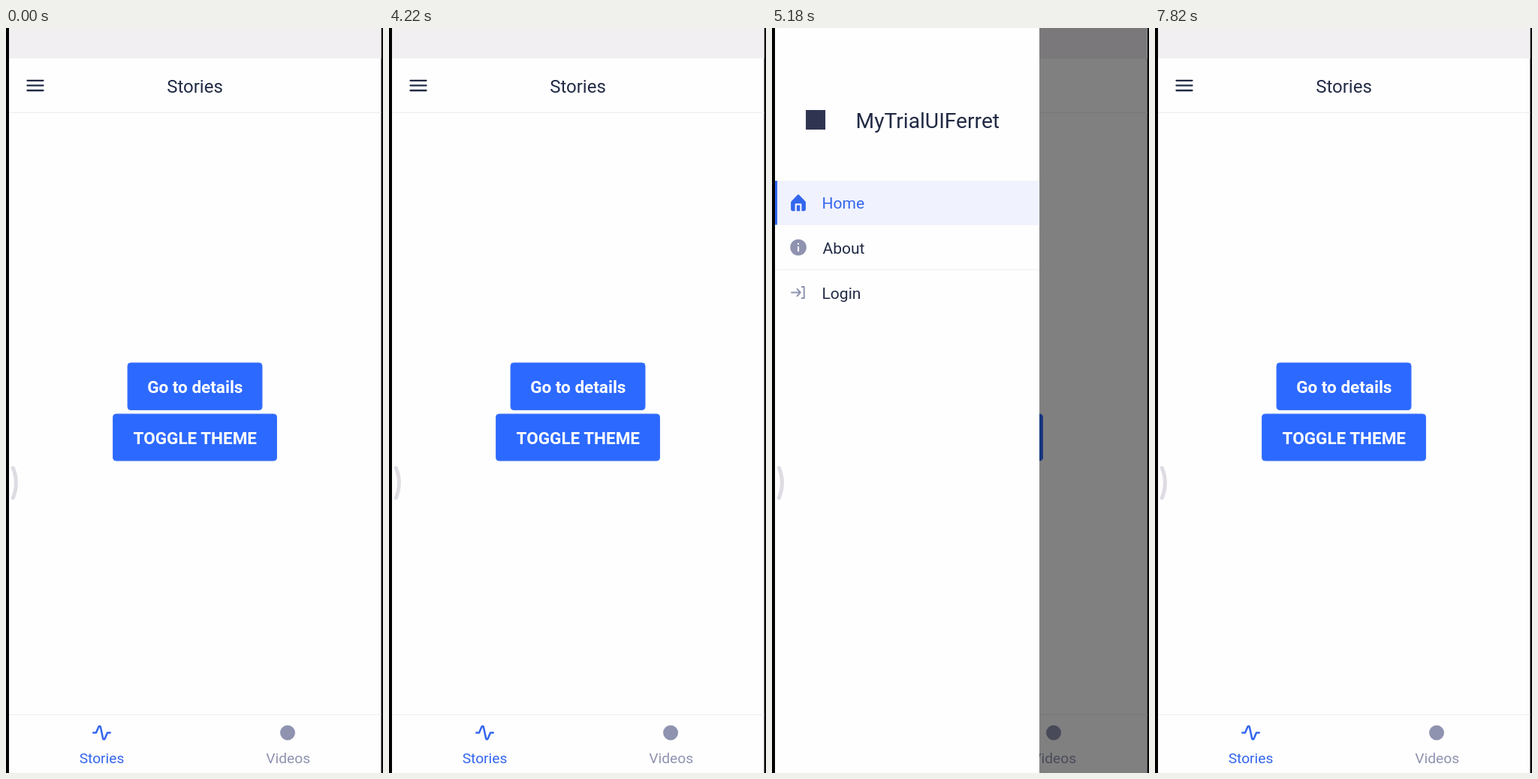
Write an HTML page that moves like this. It is 502 px wide and 990 px high and loops after 8000 ms.

```html
<!DOCTYPE html>
<html lang="en">
<head>
<meta charset="utf-8">
<title>Drawer navigation</title>
<style>
  html, body { margin: 0; width: 100%; height: 100%; overflow: hidden; background: #000; }
  svg { display: block; font-family: Roboto, Arial, sans-serif; }
  .mid { text-anchor: middle; }
  .dark { fill: #222b45; }
  .blue { fill: #3366ee; }
  .grey { fill: #8f93b0; }
  .rule { fill: #eeedf0; }
  .button rect { fill: #2c69ff; stroke: #4478f8; }
  .button text { fill: #fff; font-size: 22.5px; font-weight: 700; }
  .tab { font-size: 19.2px; }
  .item { font-size: 21px; }
  .line { fill: none; stroke-linecap: round; stroke-linejoin: round; }
</style>
</head>
<body>
<svg width="502" height="990" viewBox="0 0 502 990">
  <clipPath id="screen"><rect x="4" width="495.5" height="990"/></clipPath>
  <g clip-path="url(#screen)">
    <rect width="502" height="990" fill="#fefefe"/>
    <rect width="502" height="40.5" fill="#f2eff3"/>
    <rect class="rule" y="112" width="502" height="1"/>
    <rect class="rule" y="912" width="502" height="1"/>

    <path class="line" d="M28.5 69.8h21M28.5 76.4h21M28.5 83h21" stroke="#222b45" stroke-width="2.3"/>
    <text class="mid dark" x="251.5" y="85.5" font-size="24">Stories</text>

    <g class="button mid">
      <rect x="162" y="445" width="179" height="62.5" rx="4"/>
      <text x="251.8" y="485">Go to details</text>
      <rect x="142.5" y="513" width="218" height="62" rx="4"/>
      <text x="251.8" y="553">TOGGLE THEME</text>
    </g>

    <path class="blue" transform="translate(112.5 921.5) scale(1.25)" d="M14.33 20h-.21a2 2 0 0 1-1.76-1.58L9.68 6l-2.76 6.4A1 1 0 0 1 6 13H3a1 1 0 0 1 0-2h2.34l2.51-5.79a2 2 0 0 1 3.79.38L14.32 18l2.76-6.38A1 1 0 0 1 18 11h3a1 1 0 0 1 0 2h-2.34l-2.51 5.79A2 2 0 0 1 14.33 20z"/>
    <text class="tab mid blue" x="127.5" y="977">Stories</text>
    <circle class="grey" cx="375" cy="936.5" r="10"/>
    <text class="tab mid grey" x="375.7" y="977">Videos</text>

    <rect id="shade" width="502" height="990"/>

    <!-- drawn in its open position -->
    <g id="drawer">
      <rect x="4" width="353.5" height="990" fill="#fefefe"/>
      <rect x="46.5" y="109" width="26" height="26" fill="#2f3550"/>
      <text class="dark" x="113" y="133" font-size="28.2">MyTrialUIFerret</text>

      <rect x="4" y="203" width="353.5" height="59" fill="#f0f2fe"/>
      <rect class="blue" x="4" y="203" width="4.5" height="58.5"/>
      <path class="blue" transform="translate(23.3 219) scale(1.1)" d="M20.42 10.18L12.71 2.3a1 1 0 0 0-1.42 0l-7.71 7.89A2 2 0 0 0 3 11.62V20a2 2 0 0 0 1.89 2H8v-8a1 1 0 0 1 1-1h6a1 1 0 0 1 1 1v8h3.11A2 2 0 0 0 21 20v-8.38a2.07 2.07 0 0 0-.58-1.44zM10 15h4v7h-4z" fill-rule="evenodd"/>
      <text class="item blue" x="68" y="240">Home</text>

      <circle class="grey" cx="36.5" cy="291.5" r="10.8"/>
      <path class="line" d="M36.5 291v5.2M36.5 286.8v.1" stroke="#fff" stroke-width="2.1"/>
      <text class="item dark" x="69" y="299.5">About</text>

      <rect class="rule" x="4" y="320.7" width="353.5" height="1"/>
      <path class="line" d="M27.5 351.5h11.5M35 346.8l4.2 4.7l-4.2 4.7M41.2 344h3v15h-3" stroke="#8f93b0" stroke-width="2"/>
      <text class="item dark" x="68" y="359.5">Login</text>
    </g>

    <path class="line" d="M9.3 584.5Q17.5 604 9.3 624.5" stroke="#dfdbe3" stroke-width="5"/>
    <g id="touch">
      <circle r="17" fill="#d8d6e4" opacity=".22"/>
      <circle r="13.4" fill="#e1dfe2" stroke="#bbb8c0" stroke-width=".7"/>
    </g>
  </g>
</svg>
<script>
const LOOP = 8000, WIDTH = 353.5, FADE = 260;
const OPEN = 4720, CLOSE = 7020;
const taps = [
  { at: 4480, x: 39, y: 76.5 },
  { at: 6985, x: 418.3, y: 213.5 }
];
const [drawer, shade, touch] = ['drawer', 'shade', 'touch'].map(id => document.getElementById(id));

// critically damped spring from 0 to 1
function spring(ms) {
  const s = Math.max(0, ms) * 0.0166;
  return 1 - (1 + s) * Math.exp(-s);
}

function draw(t) {
  const open = spring(t - OPEN) - spring(t - CLOSE);
  drawer.setAttribute('transform', `translate(${(open - 1) * WIDTH} 0)`);
  shade.setAttribute('opacity', 0.5 * Math.max(0, open) ** 1.13);

  const tap = taps.find(({ at }) => t >= at && t < at + FADE);
  touch.setAttribute('opacity', tap ? 0.9 * (1 - ((t - tap.at) / FADE) ** 2) : 0);
  if (tap) touch.setAttribute('transform', `translate(${tap.x} ${tap.y})`);
}

function tick() {
  draw(performance.now() % LOOP);
  requestAnimationFrame(tick);
}
tick();
</script>
</body>
</html>
```
